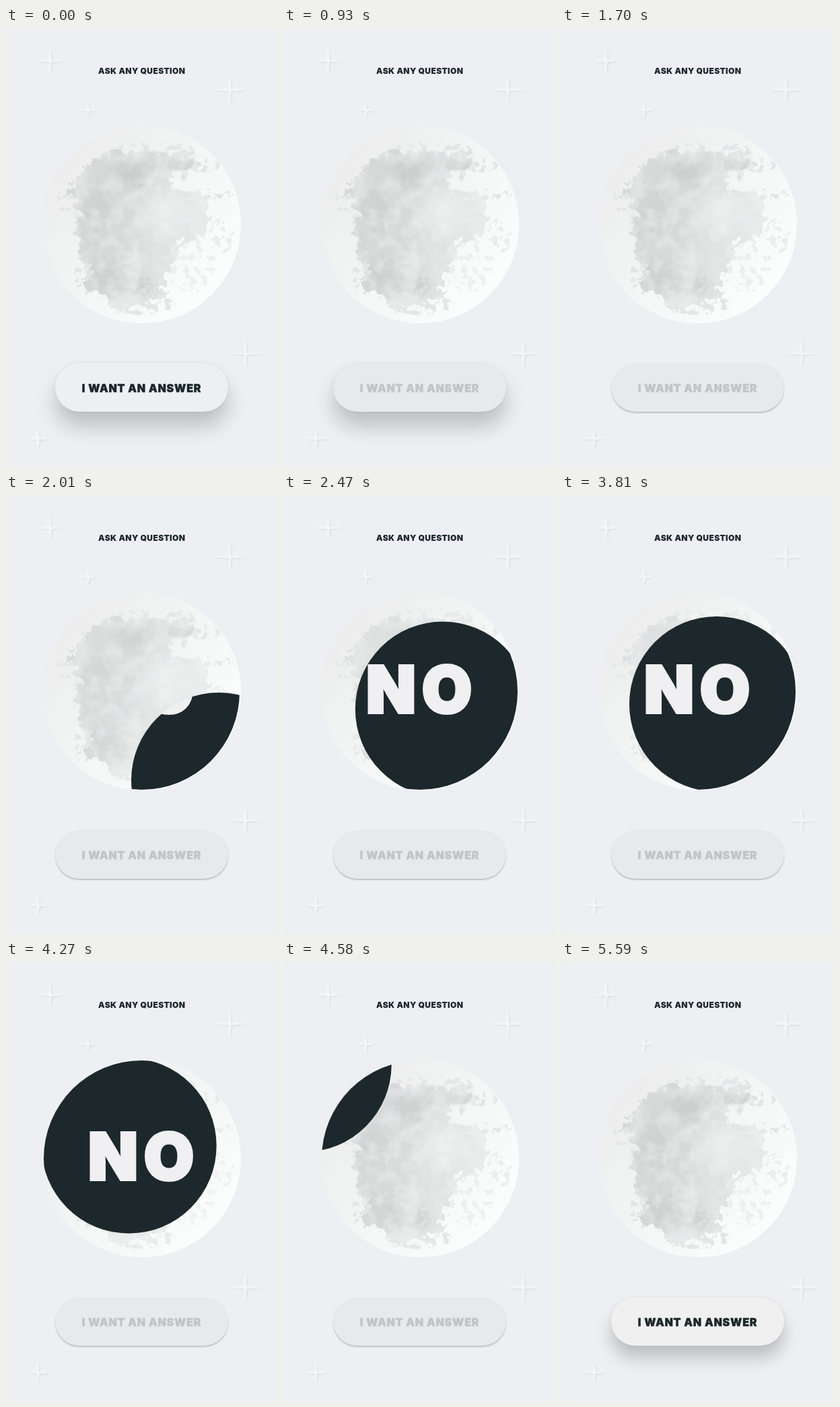
An HTML page that plays this animation: 404 by 651 pixels, repeating every 6760 ms.

```html
<!DOCTYPE html>
<html lang="en">
<head>
<meta charset="utf-8">
<title>Moon oracle</title>
<style>
  html, body { margin: 0; width: 100%; height: 100%; overflow: hidden; background: #eeeff3; }
  svg { position: absolute; left: 0; top: 0; }
  text, #button { font-family: Inter, "Open Sans", sans-serif; font-weight: 900; fill: #1b2629; }
  text { text-anchor: middle; }
  #title { font-size: 12px; letter-spacing: .4px; }
  #answer { font-size: 96px; fill: #f0f0f3; stroke: #f0f0f3; stroke-width: 4px; }
  #stars { fill: #f4f5f6; filter: drop-shadow(1.6px 1.4px 1.3px #d2d4d7) drop-shadow(-.6px -.6px .8px #f8f9fb); }
  #button {
    position: absolute; left: 73px; top: 497px; width: 257px; height: 72px;
    border-radius: 36px; font-size: 16px; letter-spacing: .8px; line-height: 74px; text-align: center;
    white-space: nowrap; -webkit-text-stroke: .4px;
  }
</style>
</head>
<body>
<svg width="404" height="651" viewBox="0 0 404 651">
  <defs>
    <linearGradient id="moonFill" x1=".12" y1=".2" x2=".85" y2=".8">
      <stop offset="0" stop-color="#ededee"/>
      <stop offset=".5" stop-color="#f4f5f5"/>
      <stop offset="1" stop-color="#fbfcfc"/>
    </linearGradient>
    <linearGradient id="landFill" x1="0" y1=".35" x2="1" y2=".5">
      <stop offset="0" stop-color="#d6d7d7"/>
      <stop offset=".45" stop-color="#d7d9d9"/>
      <stop offset="1" stop-color="#eaecec"/>
    </linearGradient>
    <radialGradient id="glow">
      <stop offset="0" stop-color="#eff1f1" stop-opacity=".8"/>
      <stop offset="1" stop-color="#eff1f1" stop-opacity="0"/>
    </radialGradient>
    <radialGradient id="shade">
      <stop offset=".3" stop-color="#c8caca" stop-opacity=".7"/>
      <stop offset="1" stop-color="#c8caca" stop-opacity="0"/>
    </radialGradient>
    <!-- Ragged coastline with soft clouds inside it -->
    <filter id="ragged" color-interpolation-filters="sRGB">
      <feTurbulence type="fractalNoise" baseFrequency=".1" numOctaves="4" seed="4" result="coast"/>
      <feDisplacementMap in="SourceGraphic" in2="coast" scale="30" xChannelSelector="R" yChannelSelector="G" result="land"/>
      <feTurbulence type="fractalNoise" baseFrequency=".04" numOctaves="4" seed="9"/>
      <feColorMatrix values="0 0 0 0 .94  0 0 0 0 .95  0 0 0 0 .95  1.4 0 0 0 -.55"/>
      <feComposite in2="land" operator="in" result="clouds"/>
      <feMerge><feMergeNode in="land"/><feMergeNode in="clouds"/></feMerge>
    </filter>
    <filter id="specks" color-interpolation-filters="sRGB">
      <feTurbulence type="fractalNoise" baseFrequency=".11" numOctaves="4" seed="12"/>
      <feColorMatrix values="0 0 0 0 .89  0 0 0 0 .9  0 0 0 0 .9  14 0 0 0 -7.6"/>
      <feComposite in2="SourceGraphic" operator="in"/>
    </filter>
    <clipPath id="moonClip"><circle cx="201.5" cy="291.5" r="145.5"/></clipPath>
    <clipPath id="eclipseClip"><circle id="eclipse" r="130"/></clipPath>
  </defs>

  <g id="stars"></g>
  <text id="title" x="201.7" y="67.5">ASK ANY QUESTION</text>

  <circle cx="202" cy="291" r="147" fill="url(#moonFill)"/>
  <g id="surface">
    <g filter="url(#specks)">
      <ellipse cx="220" cy="181" rx="70" ry="12"/>
      <ellipse cx="292" cy="203" rx="26" ry="11"/>
      <ellipse cx="302" cy="247" rx="36" ry="9"/>
      <ellipse cx="320" cy="308" rx="20" ry="26" opacity=".6"/>
      <ellipse cx="274" cy="352" rx="38" ry="40" opacity=".5"/>
      <ellipse cx="205" cy="411" rx="48" ry="15"/>
      <ellipse cx="94" cy="256" rx="20" ry="18"/>
      <ellipse cx="115" cy="365" rx="14" ry="32"/>
    </g>
    <g filter="url(#ragged)">
      <path fill="url(#landFill)" d="M152 181 185 184 212 183 245 188 278 196 277 208 254 211 247 226 248 243
        300 248 299 290 285 314 254 318 251 345 238 366 234 390 236 402 212 408 180 418 155 416 152 399
        130 392 108 383 126 368 127 354 110 342 106 315 105 295 112 276 102 264 101 246 84 252 100 228 122 204Z"/>
      <ellipse cx="188" cy="213" rx="40" ry="25" fill="url(#shade)"/>
      <ellipse cx="262" cy="202" rx="26" ry="20" fill="url(#shade)"/>
      <ellipse cx="201" cy="380" rx="20" ry="14" fill="url(#shade)"/>
      <ellipse cx="136" cy="275" rx="38" ry="62" fill="url(#shade)" opacity=".6"/>
      <ellipse cx="145" cy="365" rx="34" ry="30" fill="url(#shade)" opacity=".7"/>
      <ellipse cx="232" cy="275" rx="52" ry="52" fill="url(#glow)"/>
      <ellipse cx="190" cy="343" rx="30" ry="24" fill="url(#glow)" opacity=".7"/>
      <ellipse cx="185" cy="405" rx="40" ry="18" fill="url(#glow)" opacity=".7"/>
    </g>
  </g>

  <g clip-path="url(#moonClip)">
    <g clip-path="url(#eclipseClip)">
      <rect x="50" y="140" width="304" height="304" fill="#1c282b"/>
      <text id="answer" x="159 242" y="322.5">NO</text>
    </g>
  </g>
</svg>
<div id="button">I WANT AN ANSWER</div>

<script>
  const LOOP = 6760;
  const REST = { x: 230, y: 310 };
  const ENTER = { start: 1100, duration: 1850, dx: 162.4, dy: 213.3 };
  const LEAVE = { start: 3712, duration: 1416, dx: -243.7, dy: -192.5 };
  const byId = id => document.getElementById(id);
  const eclipse = byId('eclipse'), surface = byId('surface'), button = byId('button');

  // Center x, center y, half width, half height
  const stars = [[66, 49, 19, 19], [333, 92, 25, 21], [122, 122, 12, 12], [356, 483, 24, 22], [48, 609, 16, 15]];
  byId('stars').innerHTML = stars.map(([x, y, w, h]) => {
    const k = 1.8;
    return `<path d="M${x} ${y - h}L${x + k} ${y - k} ${x + w} ${y} ${x + k} ${y + k} ${x} ${y + h}
      ${x - k} ${y + k} ${x - w} ${y} ${x - k} ${y - k}Z"/>`;
  }).join('');

  function easeInOutQuart(x) {
    return x < .5 ? 8 * x ** 4 : 1 - 8 * (1 - x) ** 4;
  }

  function progress(t, { start, duration }) {
    return easeInOutQuart(Math.min(1, Math.max(0, (t - start) / duration)));
  }

  function buttonShadow(lift) {
    const offset = 2 + 20 * lift, blur = 2 + 28 * lift;
    return `0 ${offset}px ${blur}px rgba(0,0,0,.2), 0 0 ${5 * lift}px rgba(0,0,0,.06)`;
  }

  function buttonLift(t) {
    if (t < 1000) return 1;
    if (t < 5500) return 0;
    return t < 5590 ? .4 : .82;
  }

  function drawButton(t) {
    const disabled = t >= 930 && t < 5500;
    button.style.color = disabled ? '#c3c4c5' : '#1b2629';
    button.style.background = disabled ? '#e8e9ea' : t < 930 ? '#eeeff3' : '#f0f0f1';
    button.style.boxShadow = buttonShadow(buttonLift(t));
  }

  function draw(t) {
    const entered = progress(t, ENTER), left = progress(t, LEAVE);
    eclipse.setAttribute('cx', REST.x + ENTER.dx * (1 - entered) + LEAVE.dx * left);
    eclipse.setAttribute('cy', REST.y + ENTER.dy * (1 - entered) + LEAVE.dy * left);
    surface.setAttribute('opacity', 1 - .35 * (entered - left));
    drawButton(t);
  }

  const began = performance.now();
  function tick() {
    draw((performance.now() - began) % LOOP);
    requestAnimationFrame(tick);
  }
  tick();
</script>
</body>
</html>
```
